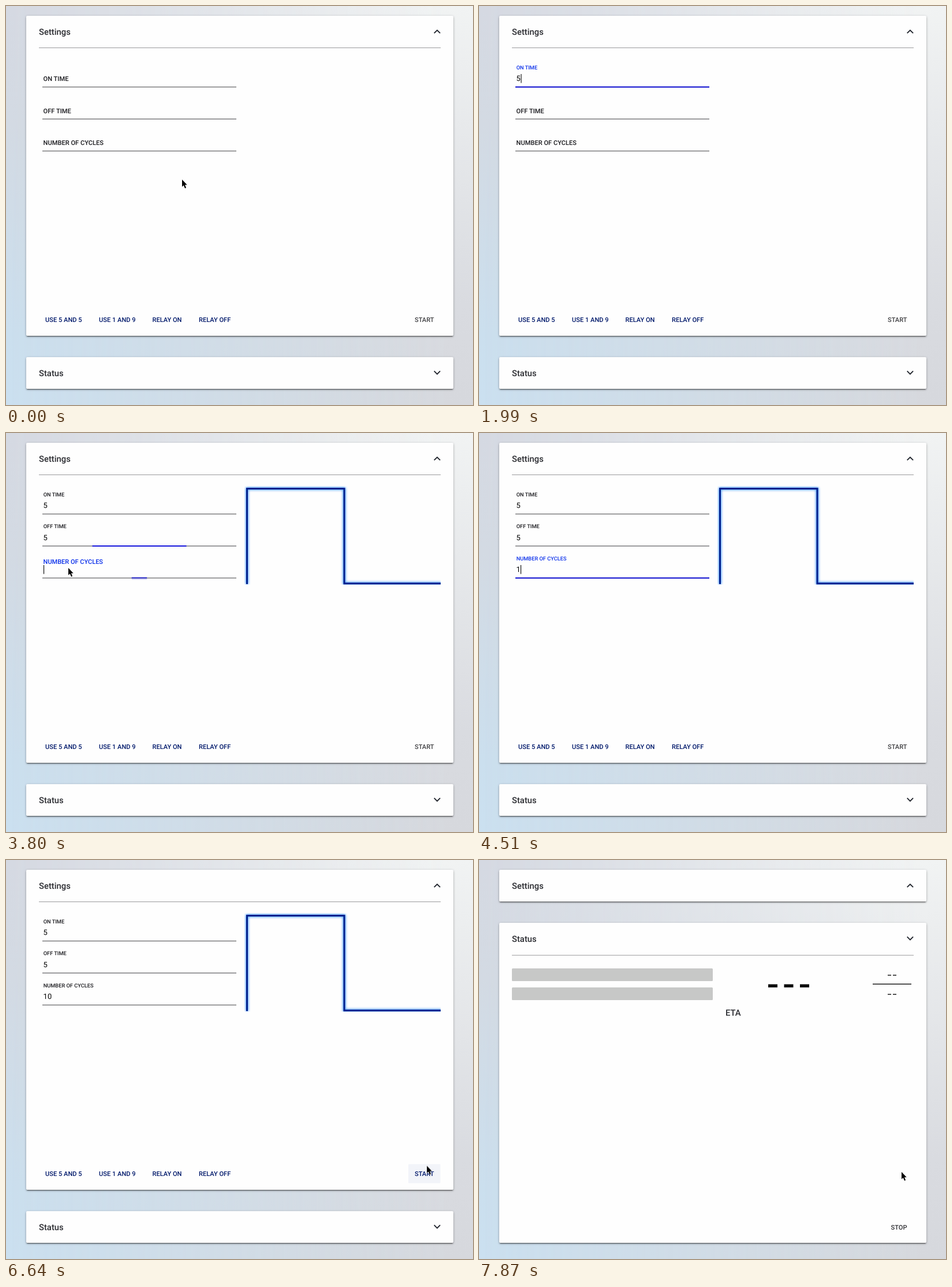
An HTML page for the animation above (8000 ms loop, 809 by 692 pixels).

```html
<!DOCTYPE html>
<html lang="en">
<head>
<meta charset="utf-8">
<title>Relay settings</title>
<style>
  html, body { margin: 0; width: 100%; height: 100%; overflow: hidden; }
  body { position: relative; background: linear-gradient(#d5d9e2, #d3dae3 30%, #cbdfee 82%, #cbe0f0); }
  .shade { position: absolute; inset: 0; background: linear-gradient(#f1f3f3, #d9dbe0 75%, #d6d8dd);
    -webkit-mask: linear-gradient(90deg, transparent, #000 95%); mask: linear-gradient(90deg, transparent, #000 95%); }
  .card { position: absolute; left: 35px; width: 740px; background: #fefefe; border-radius: 2px;
    box-shadow: 0 2px 2px rgba(0,0,0,.24), 0 3px 1px -2px rgba(0,0,0,.3), 0 1px 4px rgba(0,0,0,.22); }
  #settings { top: 17px; height: 555px; }
  #status { top: 609px; height: 55px; }
  svg { position: absolute; left: 0; top: 0; }
  text { font: 500 11.1px Roboto, sans-serif; fill: #1b1b1f; text-rendering: geometricPrecision; }
  .title { font-size: 14.8px; fill: #2b2c31; }
  .val { font-size: 12.95px; font-weight: 400; fill: #050505; }
  .nav text { fill: #00196b; }
  .chev { fill: none; stroke: #22262e; stroke-width: 1.9; }
  .rule { stroke: #9a9a9c; }
  .base { stroke: #7b7b7d; stroke-width: 1.6; }
  .focus { stroke: #1414dc; stroke-width: 2; transform-origin: 231px 0; }
  .graph { fill: none; stroke: #00208c; stroke-width: 3; filter: drop-shadow(0 0 2px #4d9dff) drop-shadow(0 0 1px #7ab6ff); }

  /* One loop is 8 s, so 1% is 80 ms. */
  .step { animation: 8s step-end infinite; }
  #settings { animation-name: fold; }
  #status { animation-name: unfold; }
  #head { animation-name: lift; }
  #form { animation-name: formOff; }
  #run { animation-name: runOn; }
  #graph { animation-name: graphOn; }
  #on5 { animation-name: on5; }
  #off5 { animation-name: off5; }
  #num1 { animation-name: num1; }
  #num0 { animation-name: num0; }
  #start { animation-name: enable; }
  #caret { animation-name: caret; }
  #arrow { animation-name: arrow; }
  #beam { animation-name: beam; }
  @keyframes fold { 98.375%, 100% { height: 55px } }
  @keyframes unfold { 98.375%, 100% { top: 109px; height: 555px } }
  @keyframes lift { 0% { transform: none } 98.375%, 100% { transform: translateY(-500px) } }
  @keyframes formOff { 0% { opacity: 1 } 98.375%, 100% { opacity: 0 } }
  @keyframes runOn { 0% { opacity: 0 } 98.375%, 100% { opacity: 1 } }
  @keyframes graphOn { 0% { opacity: 0 } 46.75%, 100% { opacity: 1 } }
  @keyframes on5 { 0% { opacity: 0 } 21.25%, 100% { opacity: 1 } }
  @keyframes off5 { 0% { opacity: 0 } 43%, 100% { opacity: 1 } }
  @keyframes num1 { 0% { opacity: 0 } 56.375%, 100% { opacity: 1 } }
  @keyframes num0 { 0% { opacity: 0 } 63%, 100% { opacity: 1 } }
  @keyframes enable { 0% { fill: #414144 } 72%, 100% { fill: #00196b } }

  /* Labels rise, then shrink, and are blue while focused. */
  .label { transform-box: fill-box; }
  #onL { transform-origin: 65px 130px; animation: onUp 8s cubic-bezier(.4,0,.2,1) infinite, onSmall 8s ease infinite, onBlue 8s step-end infinite; }
  #offL { transform-origin: 65px 185.5px; animation: offUp 8s cubic-bezier(.4,0,.2,1) infinite, offSmall 8s ease infinite, offBlue 8s step-end infinite; }
  #numL { transform-origin: 65px 241px; animation: numUp 8s cubic-bezier(.4,0,.2,1) infinite, numSmall 8s ease infinite, numBlue 8s step-end infinite; }
  .label { transform-box: view-box; }
  @keyframes onUp { 0%, 9.375% { translate: 0 0 } 12.5625%, 100% { translate: 0 -20.5px } }
  @keyframes offUp { 0%, 33.625% { translate: 0 0 } 36.8125%, 100% { translate: 0 -20.5px } }
  @keyframes numUp { 0%, 46.125% { translate: 0 0 } 49.3125%, 100% { translate: 0 -20.5px } }
  @keyframes onSmall { 0%, 10.625% { scale: 1 } 12.5%, 100% { scale: .8333 } }
  @keyframes offSmall { 0%, 34.875% { scale: 1 } 36.75%, 100% { scale: .8333 } }
  @keyframes numSmall { 0%, 47.375% { scale: 1 } 49.25%, 100% { scale: .8333 } }
  @keyframes onBlue { 0% { fill: #1b1b1f } 9.375% { fill: #0b30ea } 33.625%, 100% { fill: #1b1b1f } }
  @keyframes offBlue { 0% { fill: #1b1b1f } 33.625% { fill: #0b30ea } 46.125%, 100% { fill: #1b1b1f } }
  @keyframes numBlue { 0% { fill: #1b1b1f } 46.125% { fill: #0b30ea } 70.875%, 100% { fill: #1b1b1f } }

  /* Focus lines grow from the middle and shrink back. */
  #onF { animation: onLine 8s cubic-bezier(.4,0,.2,1) infinite; }
  #offF { animation: offLine 8s cubic-bezier(.4,0,.2,1) infinite; }
  #numF { animation: numLine 8s cubic-bezier(.4,0,.2,1) infinite; }
  @keyframes onLine {
    0%, 10.7% { transform: scaleX(0) }
    10.75% { transform: scaleX(.027); animation-timing-function: cubic-bezier(.2,.5,.3,1) }
    13.625%, 33.625% { transform: scaleX(1) }
    37.875%, 100% { transform: scaleX(0) }
  }
  @keyframes offLine {
    0%, 34.95% { transform: scaleX(0) }
    35% { transform: scaleX(.027); animation-timing-function: cubic-bezier(.2,.5,.3,1) }
    37.875%, 46% { transform: scaleX(1) }
    50.25%, 100% { transform: scaleX(0) }
  }
  @keyframes numLine {
    0%, 47.4% { transform: scaleX(0) }
    47.45% { transform: scaleX(.027); animation-timing-function: cubic-bezier(.2,.5,.3,1) }
    50.375%, 70.875% { transform: scaleX(1) }
    75.125%, 100% { transform: scaleX(0) }
  }

  @keyframes caret {
    0% { opacity: 0; transform: translate(65px, 118px) }
    9.5% { opacity: 1; transform: translate(65px, 118px) }
    15.75% { opacity: 0; transform: translate(65px, 118px) }
    21.25% { opacity: 1; transform: translate(72.5px, 118px) }
    25.75% { opacity: 0; transform: translate(72.5px, 118px) }
    31.125% { opacity: 1; transform: translate(72.5px, 118px) }
    33.625% { opacity: 1; transform: translate(65px, 174px) }
    39.875% { opacity: 0; transform: translate(65px, 174px) }
    43% { opacity: 1; transform: translate(72.5px, 174px) }
    46.125% { opacity: 1; transform: translate(65px, 229px) }
    52.5% { opacity: 0; transform: translate(65px, 229px) }
    56.375% { opacity: 1; transform: translate(72px, 229px) }
    63% { opacity: 1; transform: translate(79px, 229px) }
    69.5%, 100% { opacity: 0; transform: translate(79px, 229px) }
  }

  #hover { fill: #ccd6e9; animation: hover 8s linear infinite; }
  @keyframes hover {
    0%, 82% { opacity: 0 }
    85%, 97.35% { opacity: .7 }
    97.375%, 100% { opacity: 1 }
  }

  #mouse { animation: move 8s ease-out infinite; }
  @keyframes move {
    0%, .875% { transform: translate(305px, 301px) }
    5.25%, 20.125% { transform: translate(103px, 121px) }
    20.5%, 28.25% { transform: translate(102px, 135px) }
    31.125%, 33.5% { transform: translate(101px, 179px) }
    34.25%, 44.125% { transform: translate(103px, 183px) }
    47%, 48% { transform: translate(108px, 234px) }
    49%, 63% { transform: translate(110px, 236px) }
    67.375%, 74.5% { transform: translate(202px, 334px) }
    81.125%, 82% { transform: translate(735px, 524px) }
    85%, 86.25% { transform: translate(723px, 537px) }
    86.875%, 88.5% { transform: translate(733px, 542px) }
    89.75%, 100% { transform: translate(732px, 541px) }
  }
  @keyframes arrow {
    0% { opacity: 1 } 4.6% { opacity: 0 } 44.5% { opacity: 1 }
    48.5% { opacity: 0 } 63.25%, 100% { opacity: 1 }
  }
  @keyframes beam {
    0% { opacity: 0 } 4.6% { opacity: 1 } 20.75% { opacity: 0 } 28.25% { opacity: 1 }
    41.5% { opacity: 0 } 44.125% { opacity: 1 } 44.5% { opacity: 0 }
    48.5% { opacity: 1 } 54.625%, 100% { opacity: 0 }
  }
</style>
</head>
<body>
<div class="shade"></div>
<div id="settings" class="card step"></div>
<div id="status" class="card step"></div>
<svg width="809" height="692" viewBox="0 0 809 692">
  <defs><clipPath id="plot"><rect x="413" y="92" width="340" height="171"/></clipPath></defs>

  <text class="title" x="57" y="49.5">Settings</text>
  <path class="chev" d="M741.7 47.2l5.2-5.2 5.2 5.2"/>
  <g id="head" class="step">
    <text class="title" x="57" y="641.5">Status</text>
    <path class="chev" d="M741.7 633.2l5.2 5.2 5.2-5.2"/>
  </g>

  <g id="form" class="step">
    <path class="rule" d="M57 72.5H753"/>
    <path class="base" d="M63 140.5H399M63 196H399M63 251.5H399"/>
    <path id="onF" class="focus" d="M63 140.5H399"/>
    <path id="offF" class="focus" d="M63 196H399"/>
    <path id="numF" class="focus" d="M63 251.5H399"/>
    <text id="onL" class="label" x="64.6" y="130">ON TIME</text>
    <text id="offL" class="label" x="64.6" y="185.5">OFF TIME</text>
    <text id="numL" class="label" x="64.6" y="241">NUMBER OF CYCLES</text>
    <text id="on5" class="val step" x="64.6" y="130">5</text>
    <text id="off5" class="val step" x="64.6" y="185.5">5</text>
    <text id="num1" class="val step" x="64.6" y="241">1</text>
    <text id="num0" class="val step" x="71.9" y="241">0</text>
    <rect id="caret" class="step" width="1.1" height="15.5"/>
    <g id="graph" class="step" clip-path="url(#plot)">
      <path class="graph" d="M417.5 262V96.5H586V261H754"/>
    </g>
    <g class="nav">
      <text x="68" y="548">USE 5 AND 5</text>
      <text x="161" y="548">USE 1 AND 9</text>
      <text x="253.5" y="548">RELAY ON</text>
      <text x="334" y="548">RELAY OFF</text>
    </g>
    <rect id="hover" x="697" y="527.5" width="55.5" height="33" rx="1"/>
    <text id="start" class="step" x="708" y="548">START</text>
  </g>

  <g id="run" class="step">
    <path class="rule" d="M57 165.2H753"/>
    <g fill="#c7c8c7">
      <rect x="57" y="188" width="348" height="22" rx="1.5"/>
      <rect x="57" y="221" width="348" height="22" rx="1.5"/>
    </g>
    <path d="M501 218.3h16m11.5 0h16m11.5 0h16" stroke="#0c0c0c" stroke-width="5.6"/>
    <path d="M708 199.7h6m3 0h6M708 233h6m3 0h6M682 215.3h67" stroke="#1b1b1b" stroke-width="1.6"/>
    <text class="title" x="427" y="270.3">ETA</text>
    <text x="713.5" y="640.5" style="fill:#303034">STOP</text>
  </g>

  <g id="mouse">
    <path id="arrow" class="step" d="M0 0V12.6L2.8 10 5 15.2 7.1 14.3 4.9 9.2H8.7Z" stroke="#fff" stroke-width="1" paint-order="stroke"/>
    <g id="beam" class="step" fill="none">
      <path d="M-3 -7Q0 -7 0 -5Q0 -7 3 -7M0 -5V5M-3 7Q0 7 0 5Q0 7 3 7M-1.5 2.5H1.5" stroke="#fff" stroke-width="2.6"/>
      <path d="M-3 -7Q0 -7 0 -5Q0 -7 3 -7M0 -5V5M-3 7Q0 7 0 5Q0 7 3 7M-1.5 2.5H1.5" stroke="#222" stroke-width="1.2"/>
    </g>
  </g>
</svg>
</body>
</html>
```
